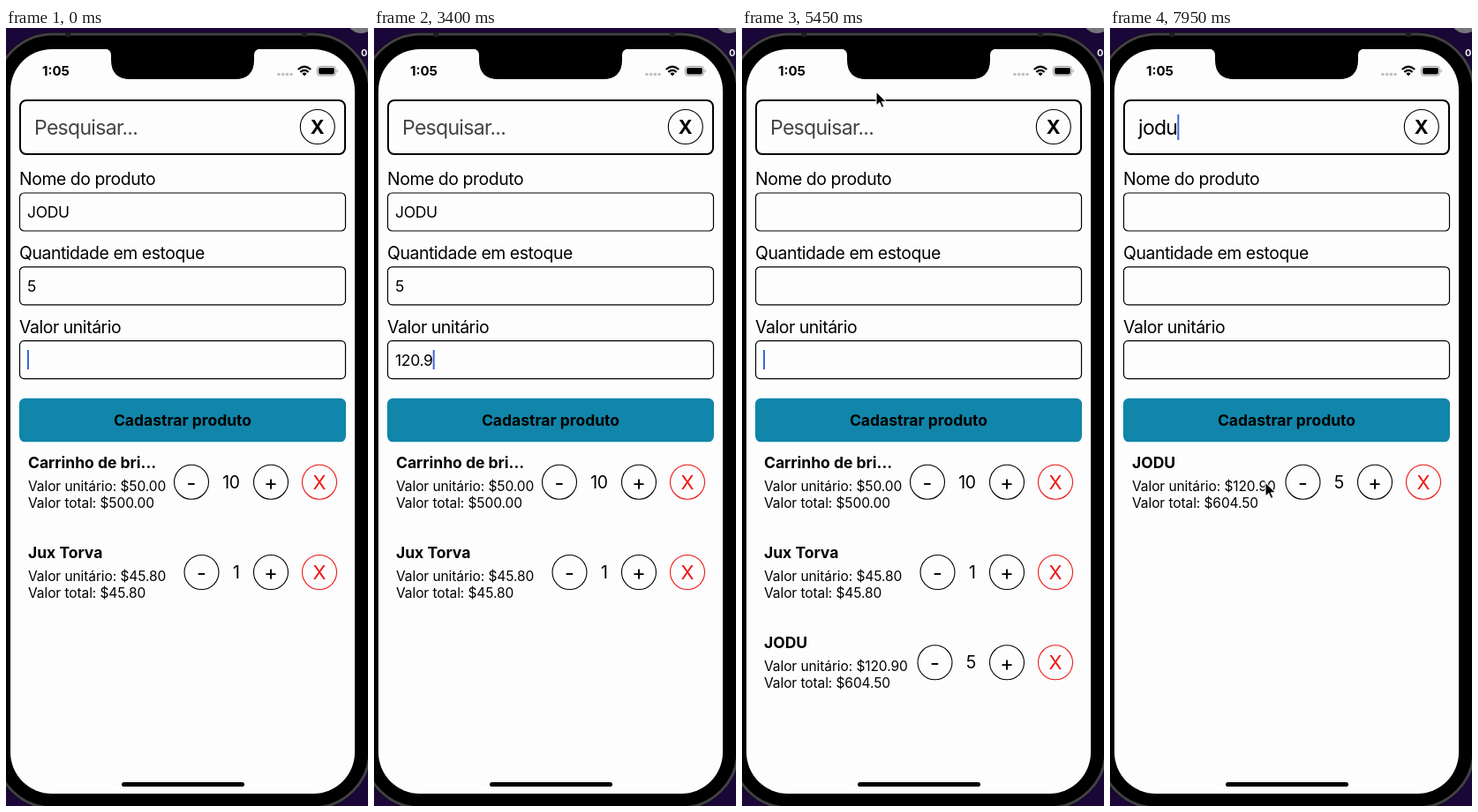
These frames come from a looping animation (410x882 px, 8 s). An HTML page:

```html
<!DOCTYPE html>
<html lang="pt-BR">
<head>
<meta charset="utf-8">
<title>Cadastro de produtos</title>
<style>
  html, body { margin: 0; width: 100%; height: 100%; overflow: hidden; background: #000; }
  svg { display: block; width: 410px; height: 882px; }
  text { font-family: Inter, "Open Sans", sans-serif; font-size: 17.5px; white-space: pre; }
  .label { font-size: 19.4px; letter-spacing: -.022em; }
  .value { letter-spacing: -.017em; }
  .search { font-size: 23px; letter-spacing: -.03em; }
  .detail { font-size: 15.5px; letter-spacing: -.005em; }
  .count { font-size: 19.4px; letter-spacing: -.02em; }
  .sign { font-size: 23.5px; }
  .bold { font-weight: 700; }
  .mid { text-anchor: middle; }
  .box { fill: none; stroke: #000; stroke-width: 1.2; }
  .ring { fill: none; stroke: #000; stroke-width: 1.1; }
  .red { stroke: #f01414; }
  .redText { fill: #f01414; }
</style>
</head>
<body>
<svg id="stage" viewBox="0 0 410 882">
  <rect width="410" height="882" fill="#1b0638"/>
  <circle cx="402" cy="-10" r="16" fill="#77747d"/>
  <text x="402" y="32" fill="#eee" style="font-size:11px" class="bold">0</text>
  <!-- phone -->
  <rect x="-14" y="5" width="428" height="881" rx="67" fill="#000"/>
  <rect x="-12" y="7" width="424" height="877" rx="65" fill="none" stroke="#414144" stroke-width="3"/>
  <path d="M70 5v5M338 5v5" stroke="#1c1c1e" stroke-width="6"/>
  <rect x="5" y="24" width="390" height="844" rx="47" fill="#fdfdfd"/>
  <path d="M112 23.5Q119 24 119 31V36Q119 58 141 58H259Q281 58 281 36V31Q281 24 288 23.5Z"/>
  <rect x="131" y="855" width="139" height="5" rx="2.5"/>
  <!-- status bar -->
  <text x="41" y="54" class="bold" style="font-size:15px">1:05</text>
  <g fill="#c0c0c2">
    <circle cx="309" cy="52.5" r="1.8"/><circle cx="313.7" cy="52.5" r="1.8"/>
    <circle cx="318.3" cy="52.5" r="1.8"/><circle cx="323" cy="52.5" r="1.8"/>
  </g>
  <g fill="none" stroke="#000" stroke-width="2.3">
    <path d="M330.8 47Q338 40.5 345.2 47M333.4 50Q338 45.8 342.6 50"/>
  </g>
  <path d="M335.4 51.6Q338 49.4 340.6 51.6L338 54.4Z"/>
  <rect x="352.5" y="43.5" width="21" height="10.5" rx="3.2" fill="none" stroke="#929294"/>
  <rect x="354" y="45" width="18" height="7.5" rx="2"/>
  <path d="M375 47Q377 48.8 375 50.6Z" fill="#929294"/>
  <!-- search -->
  <rect x="16" y="82" width="368" height="61" rx="7" class="box" style="stroke-width:2"/>
  <circle cx="352.8" cy="112" r="19.5" class="ring"/>
  <text x="352.8" y="119.7" class="bold mid" style="font-size:21.5px">X</text>
  <text id="search" x="32" y="121" class="search"></text>
  <g id="form"></g>
  <g id="button">
    <rect x="15" y="419.7" width="370" height="49.6" rx="6.5" fill="#1186aa"/>
    <text x="200" y="451" class="bold mid">Cadastrar produto</text>
  </g>
  <g id="list"></g>
  <rect id="caret" width="2" fill="#3e67d2"/>
  <path id="mouse" d="M0 0V16.2L3.8 12.7L6.3 18.4L9 17.2L6.5 11.7H11.6Z" stroke="#fff" stroke-width="1.1"/>
</svg>
<script>
const LOOP = 8000;
const $ = id => document.getElementById(id);

function add(parent, tag, attrs, content = '') {
  const el = document.createElementNS('http://www.w3.org/2000/svg', tag);
  for (const key in attrs) el.setAttribute(key, attrs[key]);
  el.textContent = content;
  return parent.appendChild(el);
}
const write = (parent, x, y, cls, content) => add(parent, 'text', { x, y, class: cls }, content);

const fields = ['Nome do produto', 'Quantidade em estoque', 'Valor unitário'].map((label, i) => {
  const y = 187 + i * 83.8;
  write($('form'), 15, y - 9, 'label', label);
  add($('form'), 'rect', { x: 15.5, y, width: 369, height: 43, rx: 5, class: 'box' });
  return write($('form'), 24, y + 28, 'value', '');
});

function makeRow({ title, price, count, minus }) {
  const row = add($('list'), 'g', {});
  write(row, 25, 498.5, 'bold', title);
  write(row, 25, 524.5, 'detail', `Valor unitário: $${price.toFixed(2)}`);
  write(row, 25, 543.7, 'detail', `Valor total: $${(price * count).toFixed(2)}`);
  const ring = (cx, cls) => add(row, 'circle', { cx, cy: 514.7, r: 19.5, class: 'ring ' + cls });
  ring(minus, '');
  ring(300, '');
  ring(355, 'red');
  write(row, minus, 523.5, 'sign mid', '-');
  write(row, (minus + 300) / 2, 521.8, 'count mid', count);
  write(row, 300, 524, 'sign mid', '+');
  write(row, 355, 522.8, 'mid redText', 'X').style.fontSize = '22px';
  return row;
}
const rows = [
  { title: 'Carrinho de bri...', price: 50, count: 10, minus: 210 },
  { title: 'Jux Torva', price: 45.8, count: 1, minus: 221.5 },
  { title: 'JODU', price: 120.9, count: 5, minus: 218.5 }
].map(makeRow);

// Step tables: [start time, value]
const priceSteps = [[0, ''], [500, '1'], [750, '12'], [1000, '120'], [1900, '120.'], [2450, '120.9'], [4400, '']];
const querySteps = [[0, ''], [6350, 'j'], [6500, 'jo'], [6650, 'jod'], [6800, 'jodu']];
const rowSteps = [[0, [0, 1]], [4400, [0, 1, 2]], [6350, [1, 2]], [6500, [2]]];
const mouseShown = [[0, false], [3600, true], [6300, false], [6950, true]];
const SUBMIT = 4400, FOCUS_SEARCH = 5850;

// Key tables: [time, ...numbers]
const mouseKeys = [[3600, 96, 377], [4000, 80, 438], [4550, 80, 438], [5300, 152, 72],
  [5500, 152, 72], [5750, 150, 98], [7150, 150, 98], [7800, 176, 515], [8000, 176, 515]];
const fadeKeys = [[4050, 1], [4200, .22], [4350, .22], [4600, 1]];

const stepAt = (table, t) => table.findLast(([start]) => start <= t)[1];

function tween(keys, t) {
  if (t <= keys[0][0]) return keys[0].slice(1);
  const next = keys.findIndex(key => key[0] > t);
  if (next < 0) return keys.at(-1).slice(1);
  const a = keys[next - 1], b = keys[next];
  const p = (t - a[0]) / (b[0] - a[0]);
  const ease = p * p * (3 - 2 * p);
  return a.slice(1).map((v, i) => v + (b[i + 1] - v) * ease);
}

function setText(el, value) {
  if (el.textContent !== value) el.textContent = value;
}

function placeCaret(field, start, y, height) {
  const width = field.textContent ? field.getComputedTextLength() : 0;
  $('caret').setAttribute('x', start + width);
  $('caret').setAttribute('y', y);
  $('caret').setAttribute('height', height);
}

function draw(t) {
  const query = stepAt(querySteps, t);
  const filled = t < SUBMIT;
  setText(fields[0], filled ? 'JODU' : '');
  setText(fields[1], filled ? '5' : '');
  setText(fields[2], stepAt(priceSteps, t));
  setText($('search'), query || 'Pesquisar...');
  $('search').setAttribute('fill', query ? '#000' : '#444446');

  if (t < FOCUS_SEARCH) placeCaret(fields[2], 24, 365, 22);
  else if (query) placeCaret($('search'), 32, 98, 29);
  else placeCaret({ textContent: '' }, 32, 98, 29);

  const shown = stepAt(rowSteps, t);
  rows.forEach((row, i) => {
    const slot = shown.indexOf(i);
    row.setAttribute('display', slot < 0 ? 'none' : 'inline');
    row.setAttribute('transform', `translate(0 ${slot * 102.3})`);
  });

  $('button').setAttribute('opacity', tween(fadeKeys, t)[0]);
  $('mouse').setAttribute('display', stepAt(mouseShown, t) ? 'inline' : 'none');
  $('mouse').setAttribute('transform', `translate(${tween(mouseKeys, t)})`);
}

const began = performance.now();
function tick() {
  draw((performance.now() - began) % LOOP);
  requestAnimationFrame(tick);
}
tick();
</script>
</body>
</html>
```
